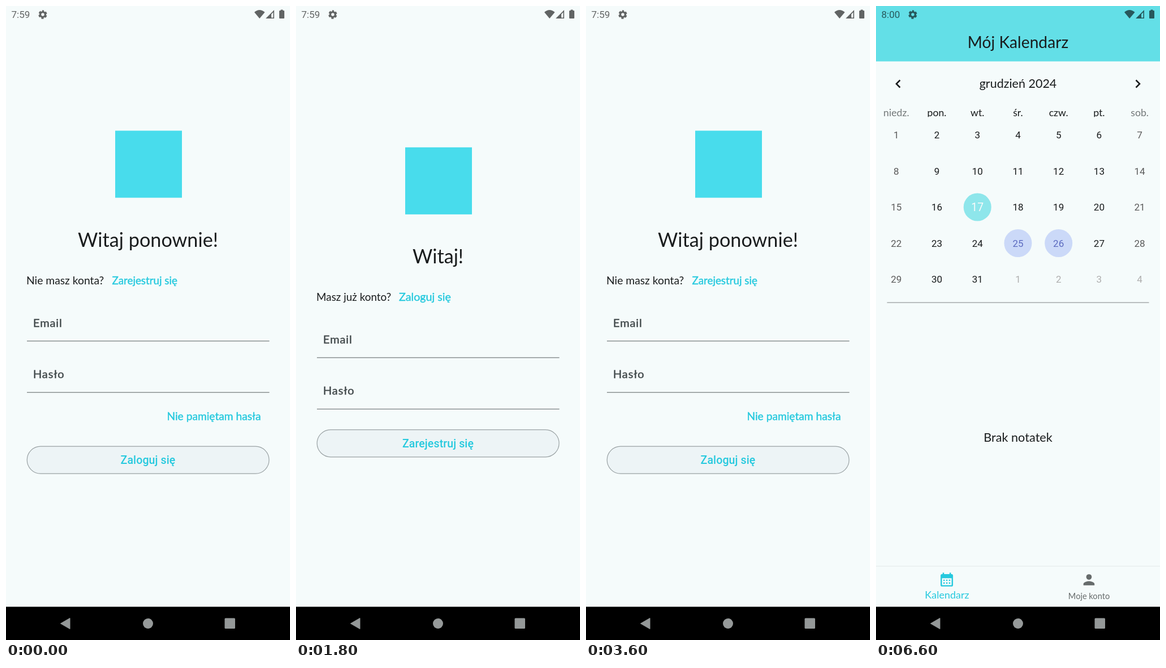
An HTML page for the animation above (8 s loop, 502 px wide and 1116 px high).

```html
<!DOCTYPE html>
<html lang="pl">
<head>
<meta charset="utf-8">
<title>Kalendarz</title>
<style>
html, body { margin: 0; width: 100%; height: 100%; overflow: hidden; background: #f5fbfb; }
svg { display: block; width: 502px; height: 1116px; }
text { font-family: Lato, "Open Sans", sans-serif; font-weight: 400; }
.roboto { font-family: Roboto, Inter, sans-serif; }
.button { font-weight: 500; letter-spacing: .12px; }
.medium { stroke: currentColor; stroke-width: .45px; }
.field { letter-spacing: .9px; }
</style>
</head>
<body>
<svg id="stage" viewBox="0 0 502 1116"></svg>
<script>
const INK = '#191c1d', CYAN = '#26c9de', TEAL = '#006874', BG = '#f5fbfb';
const LOOP = 8000;
const steps = [
  [0, () => login()],
  [1500, () => login({ chip: true })],
  [1800, () => register()],
  [3300, () => register(true)],
  [3600, () => login()],
  [5100, () => login({ filled: true })],
  [6600, calendar]
];

const text = (str, x, y, size, color = INK, cls = '', anchor = 'start') =>
  `<text x="${x}" y="${y}" font-size="${size}" fill="${color}" color="${color}" class="${cls}" text-anchor="${anchor}">${str}</text>`;
const centered = (str, x, y, size, color, cls) => text(str, x, y, size, color, cls, 'middle');
const rect = (x, y, w, h, fill, extra = '') =>
  `<rect x="${x}" y="${y}" width="${w}" height="${h}" fill="${fill}" ${extra}/>`;
const circle = (x, y, r, fill) => `<circle cx="${x}" cy="${y}" r="${r}" fill="${fill}"/>`;
const path = (d, fill, extra = '') => `<path d="${d}" fill="${fill}" ${extra}/>`;

// Six teeth around a ring, one pointing straight up.
function gear(x, y) {
  const pitch = 2 * Math.PI * 6.4 / 6, tooth = 4;
  return `<g transform="translate(${x} ${y}) rotate(-90)" fill="none" stroke="#000">
    <circle r="4.4" stroke-width="3.4"/>
    <circle r="6.4" stroke-width="2.6" stroke-dasharray="${tooth} ${pitch - tooth}" stroke-dashoffset="${tooth / 2}"/></g>`;
}

function statusBar(time) {
  return `<g opacity=".6">` + text(time, 9.5, 21, 17.1, '#000', 'roboto') + gear(65, 15) +
    path('M439 11Q448 3 457.5 11L448.2 22Z', '#000') +
    path('M459 22L474 7V22ZM469 14.5V20.4H472.4V11.1Z', '#000', 'fill-rule="evenodd"') +
    path('M485.5 8V6.5H489.5V8H491Q492 8 492 9V21Q492 22 491 22H484Q483 22 483 21V9Q483 8 484 8Z', '#000') +
    '</g>';
}

function navBar(color = '#959999') {
  return rect(0, 1057.5, 502, 58.5, '#000') +
    path('M96.5 1087L113 1077.5V1096.5Z', color, `stroke="${color}" stroke-linejoin="round"`) +
    circle(251, 1087, 9, color) +
    rect(386.5, 1077.5, 18.5, 18.5, color, 'rx="1.5"');
}

const screen = (body, time = '7:59', nav) =>
  rect(0, 0, 502, 1116, BG) + body + statusBar(time) + navBar(nav);

const chipShape = (x, y, w) => rect(x, y, w, 48.5, '#c6dfe2', 'rx="24.25"');
const line = (y, color = '#7d8384', h = 1.3) => rect(37, y - h / 2, 428.5, h, color);
const logo = y => rect(193, y, 118, 118, '#48dcec');

function button(label, y, pressed) {
  const shadow = pressed ? 'style="filter:drop-shadow(0 3px 3px rgba(0,0,0,.3))"' : '';
  return rect(37.2, y, 427.8, 48, pressed ? '#c1dadd' : '#edf4f6', `rx="24" stroke="#9aa2a4" stroke-width="1.2" ${shadow}`) +
    centered(label, 251, y + 31, 19.5, CYAN, 'roboto button');
}

const fieldText = (str, y, color = '#40484a') => text(str, 48, y, 20, color, 'medium field');

function password() {
  let dots = '';
  for (let i = 0; i < 6; i++) dots += circle(52.7 + i * 7.35, 647, 2.5, INK);
  return dots + rect(93, 632, 2.5, 30, TEAL) + line(679.5, TEAL, 2.5);
}

function login({ chip, filled } = {}) {
  return screen(
    logo(219.5) +
    centered('Witaj ponownie!', 251, 424, 34.2) +
    (chip ? chipShape(173.5, 458.8, 144.5) : '') +
    text('Nie masz konta?', 36, 490, 19.3) +
    text('Zarejestruj się', 187.5, 490, 18.8, CYAN, 'medium') +
    (filled ? fieldText('lenatestna@example.com', 565, INK) : fieldText('Email', 565)) +
    line(589.7) +
    (filled ? password() : fieldText('Hasło', 655) + line(680.2)) +
    text('Nie pamiętam hasła', 450.5, 729, 19.2, CYAN, 'medium', 'end') +
    button('Zaloguj się', 775.1, filled),
    filled ? '8:00' : '7:59', filled ? '#d8dcdc' : undefined);
}

function register(chip) {
  return screen(
    logo(248.8) +
    centered('Witaj!', 251, 453, 34.2) +
    (chip ? chipShape(168, 488, 121.5) : '') +
    text('Masz już konto?', 36, 519.3, 18.9) +
    text('Zaloguj się', 182, 519.3, 19.7, CYAN, 'medium') +
    fieldText('Email', 594) + line(619) +
    fieldText('Hasło', 684) + line(709.5) +
    button('Zarejestruj się', 745.8));
}

function monthGrid() {
  const names = ['niedz.', 'pon.', 'wt.', 'śr.', 'czw.', 'pt.', 'sob.'];
  const colX = i => 35.86 + 71.71 * i;
  const weekend = i => i % 7 === 0 || i % 7 === 6;
  let out = '<clipPath id="head"><rect y="170" width="502" height="25.3"/></clipPath><g clip-path="url(#head)">' +
    names.map((n, i) => centered(n, colX(i), 194, 17.7, weekend(i) ? '#737879' : INK)).join('') + '</g>';
  for (let i = 0; i < 35; i++) {
    const day = i % 31 + 1, x = colX(i % 7), y = 227 + 63.5 * Math.floor(i / 7);
    const today = i === 16, holiday = i === 24 || i === 25;
    if (today || holiday) out += circle(x, y, 24.5, today ? '#8ee6eb' : '#cbd9f8');
    const color = today ? '#fafafa' : holiday ? '#5c6bc0' : i > 30 ? '#aeaeae' : weekend(i) ? '#5a5a5a' : INK;
    out += centered(day, x, y + (today ? 7 : 6.1), today ? 19.5 : 17.1, color, 'roboto');
  }
  return out;
}

function tabs() {
  const calendarIcon = 'M19 4h-1V2h-2v2H8V2H6v2H5c-1.1 0-2 .9-2 2v14c0 1.1.9 2 2 2h14c1.1 0 2-.9 2-2V6c0-1.1-.9-2-2-2zm0 16H5V10h14z' +
    [7, 11, 15].map(x => `M${x} 12h2v2h-2zM${x} 16h2v2h-2z`).join('');
  return rect(0, 985.5, 502, 1.2, '#e6ecec') +
    path(calendarIcon, CYAN, 'fill-rule="evenodd" transform="translate(110.5 995) scale(1.22)"') +
    `<g transform="translate(361.8 995.3) scale(1.22)">` + circle(12, 8, 4, '#666b6b') +
    path('M4 20v-2c0-2.7 5.3-4 8-4s8 1.3 8 4v2z', '#666b6b') + '</g>' +
    centered('Kalendarz', 125.5, 1043, 18, CYAN) +
    centered('Moje konto', 376.5, 1043.5, 14.6, '#666b6b');
}

function calendar() {
  const arrow = `fill="none" stroke="${INK}" stroke-width="2.6"`;
  return screen(
    rect(0, 0, 502, 97.5, '#63dfe7') +
    centered('Mój Kalendarz', 251, 74, 28.2) +
    `<path d="M42.5 130.5L36 137L42.5 143.5M459.5 130.5L466 137L459.5 143.5" ${arrow}/>` +
    centered('grudzień 2024', 251, 144, 21.5) +
    monthGrid() +
    rect(19.5, 521.4, 463, 1.3, '#9b9fa0') +
    centered('Brak notatek', 251, 767, 21.7) +
    tabs(), '8:00');
}

const stage = document.getElementById('stage');
const start = performance.now();
let shown = null;

function tick() {
  const t = (performance.now() - start) % LOOP;
  const step = steps.findLast(([from]) => from <= t);
  if (step !== shown) {
    shown = step;
    stage.innerHTML = step[1]();
  }
  requestAnimationFrame(tick);
}
tick();
</script>
</body>
</html>
```
